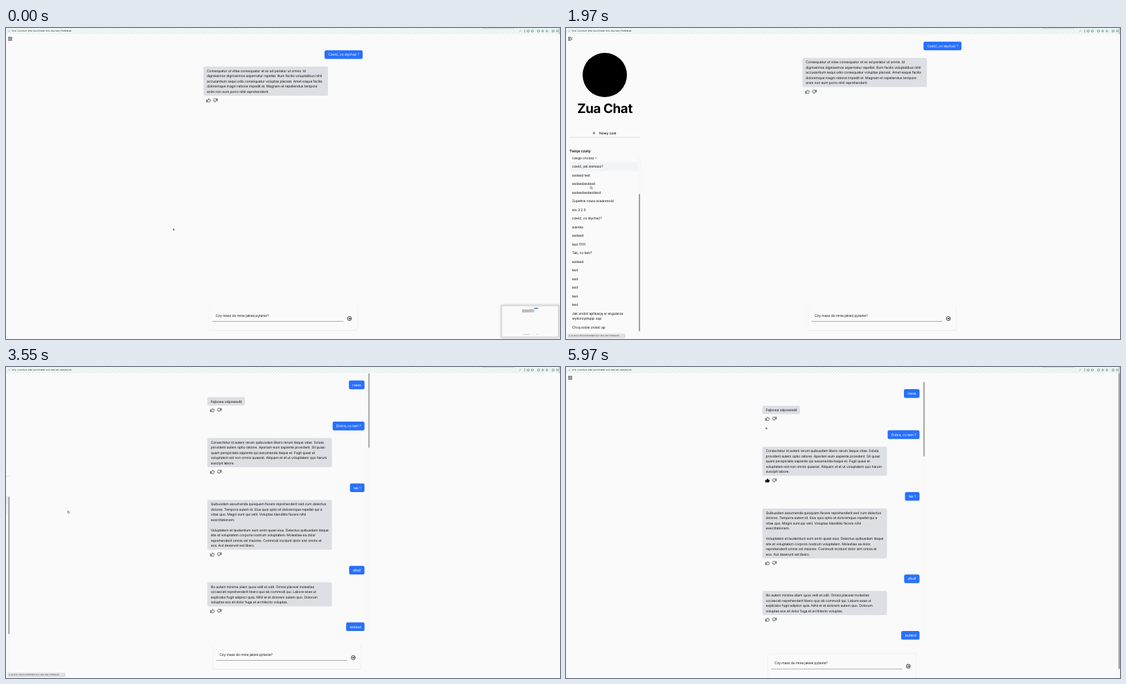
Write an HTML page that moves like this. It is 800 px wide and 450 px high and loops after 6000 ms.

```html
<!DOCTYPE html>
<html lang="pl">
<head>
<meta charset="utf-8">
<title>Chat</title>
<style>
html, body { margin: 0; width: 100%; height: 100%; overflow: hidden; background: #fafafa; }
svg { display: block; width: 100vw; height: 100vh; }
text {
  font: 5px Inter, "Open Sans", sans-serif; letter-spacing: -.02em; fill: #141414;
  text-rendering: geometricPrecision; white-space: pre;
}
.white { fill: #fff; }
.title { font-size: 18.75px; font-weight: 700; fill: #000; }
.head { font-size: 5.5px; font-weight: 600; }
.bold { font-weight: 500; }
.url { font: 700 2.28px "DejaVu Sans Mono", monospace; letter-spacing: 0; fill: #333; }
.link { font-size: 2.4px; letter-spacing: 0; fill: #333; }
.icon { fill: none; stroke: #222; stroke-width: 1.9; stroke-linejoin: round; }
.line { fill: none; stroke: #222; stroke-width: .9; }

/* One loop is 6 s, so 1 % is 60 ms. */
.slide { animation: 6s linear infinite; }
.step { animation: 6s step-end infinite; }
#chatA { animation-name: chatA; }
#msgA { animation-name: msgA; }
#chatB { animation-name: chatB; }
#pageB { animation-name: pageB; }
#side { animation-name: side; }
#list { animation-name: list; }
#thumb { animation-name: thumb; }
#hover { animation-name: hover; }
#status { animation-name: status; }
#preview { animation-name: preview; }
#pointer { animation-name: pointer; }
.first { animation-name: first; }
.second { animation-name: second; }
.burger { animation-name: burger; }
.late { animation-name: late; }
.arrow { animation-name: arrow; }
.hand { animation-name: hand; }
.beam { animation-name: beam; }
.liked { animation-name: liked; }

@keyframes first { 0% { visibility: visible } 56.3% { visibility: hidden } }
@keyframes second { 0% { visibility: hidden } 56.3% { visibility: visible } }
@keyframes burger { 0% { visibility: visible } 13.5% { visibility: hidden } 63% { visibility: visible } }
@keyframes late { 0% { visibility: hidden } 63% { visibility: visible } }
@keyframes liked { 0% { fill: none; stroke: #222 } 83.8% { fill: #000; stroke: #000 } }
@keyframes msgA { 0% { transform: translateY(12.5px) } 13.5% { transform: none } }
@keyframes chatA {
  0%, 13.83% { transform: translateX(0); animation-timing-function: cubic-bezier(.25,.8,.25,1) }
  20.5%, 100% { transform: translateX(56.2px) }
}
@keyframes chatB {
  0%, 56.3% { transform: translateX(56.2px); animation-timing-function: cubic-bezier(.25,.8,.25,1) }
  63%, 100% { transform: translateX(0) }
}
@keyframes pageB { 0% { transform: translate(1.6px,-12.5px) } 63% { transform: none } }
@keyframes side {
  0%, 13.83% { transform: translateX(-113px); animation-timing-function: cubic-bezier(.25,.8,.25,1) }
  20.5%, 56.3% { transform: translateX(0); animation-timing-function: cubic-bezier(.25,.8,.25,1) }
  63%, 100% { transform: translateX(-113px) }
}
@keyframes list {
  0%, 28.5% { transform: translateY(0); animation-timing-function: ease-in-out }
  34%, 40% { transform: translateY(-74.5px) }
  41.5% { transform: translateY(-62.7px); animation-timing-function: ease-out }
  47.5%, 100% { transform: translateY(0) }
}
@keyframes thumb {
  0%, 28.5% { transform: translateY(0); animation-timing-function: ease-in-out }
  34%, 40% { transform: translateY(57.7px) }
  41.5% { transform: translateY(48.5px); animation-timing-function: ease-out }
  47.5%, 100% { transform: translateY(0) }
}
@keyframes hover {
  0% { visibility: hidden }
  24% { visibility: visible; transform: translateY(12.5px) }
  25% { visibility: visible; transform: translateY(25px) }
  28% { visibility: visible; transform: translateY(37.5px) }
  31% { visibility: visible; transform: translateY(75px) }
  33% { visibility: visible; transform: translateY(112.5px) }
  43% { visibility: visible; transform: translateY(75px) }
  47% { visibility: visible; transform: translateY(37.5px) }
  50% { visibility: visible; transform: translateY(25px) }
  52.5% { visibility: visible; transform: translateY(12.5px) }
}
@keyframes status { 0%, 31% { opacity: 0 } 32%, 65.3% { opacity: 1 } 67.2%, 100% { opacity: 0 } }
@keyframes preview {
  0%, 18.5% { transform: none; animation-timing-function: ease-in }
  23%, 100% { transform: translateX(92px) }
}
@keyframes pointer {
  0%, .4% { transform: translate(241.3px,289.8px) }
  1% { transform: translate(95px,120px) }
  1.5%, 17% { transform: translate(4.8px,16.3px); animation-timing-function: ease-in-out }
  24%, 26% { transform: translate(36.3px,216px) }
  28.5%, 42% { transform: translate(35.5px,229px); animation-timing-function: ease-in-out }
  53%, 56.5% { transform: translate(21.5px,207px); animation-timing-function: ease-in-out }
  65%, 67.5% { transform: translate(346.8px,211px); animation-timing-function: ease-in-out }
  75% { transform: translate(298px,163px) }
  81.3%, 85% { transform: translate(291px,163.5px); animation-timing-function: ease-in-out }
  93%, 94.5% { transform: translate(290.5px,127.5px); animation-timing-function: ease-in-out }
  99.2%, 100% { transform: translate(288.4px,87px) }
}
@keyframes arrow {
  0% { visibility: visible } 23.5% { visibility: hidden } 60% { visibility: visible }
  65% { visibility: hidden } 70% { visibility: visible } 75% { visibility: hidden }
  86% { visibility: visible } 88% { visibility: hidden } 95.5% { visibility: visible }
}
@keyframes hand {
  0% { visibility: hidden } 23.5% { visibility: visible } 60% { visibility: hidden }
  75% { visibility: visible } 86% { visibility: hidden }
}
@keyframes beam {
  0% { visibility: hidden } 65% { visibility: visible } 70% { visibility: hidden }
  88% { visibility: visible } 95.5% { visibility: hidden }
}
</style>
</head>
<body>
<svg viewBox="0 0 800 450" preserveAspectRatio="none">
  <defs>
    <pattern id="stripes" width="3.2" height="3.2" patternUnits="userSpaceOnUse" patternTransform="rotate(45)">
      <rect width="3.2" height="3.2" fill="#f6faf9"/><rect width="1.5" height="3.2" fill="#e2efed"/>
    </pattern>
    <clipPath id="listBox"><rect x="0" y="187" width="112" height="258.5"/></clipPath>
    <filter id="soft" x="-20%" y="-20%" width="140%" height="140%"><feGaussianBlur stdDeviation="1.3"/></filter>
    <filter id="faint" x="-5%" y="-20%" width="110%" height="140%"><feGaussianBlur stdDeviation=".6"/></filter>
    <path id="like" d="M7.5 9.5 13.7 2.5 15 4 13.8 9H22v3l-3.3 8.2H7.5zM2 9.5h2.8v10.7H2z"/>
  </defs>
  <rect width="800" height="450" fill="#fafafa"/>

  <g id="chatA" class="slide"><g class="step first">
    <g id="msgA" class="step"></g>
    <g id="inputA"></g>
  </g></g>

  <g id="chatB" class="slide"><g class="step second"><g id="pageB" class="step">
    <path d="M515.6 22V397M518.4 22V397" stroke="#f0f0f0" stroke-width=".5"/>
    <rect x="516" y="21.5" width="2" height="108" rx="1" fill="#a9a9a9"/>
    <g id="msgB"></g>
    <g id="inputB" transform="translate(-1.7 12.5)"></g>
  </g></g></g>

  <g class="step late">
    <path d="M797.6 9V450" stroke="#eee" stroke-width=".5"/>
    <rect x="798" y="9" width="1.6" height="428" rx=".8" fill="#8c8c8c"/>
  </g>
  <path class="line step burger" d="M3 13.5H9M3 15.5H9M3 17.5H9"/>

  <g id="side" class="slide">
    <rect y="9" width="112" height="441" fill="#fafafa"/>
    <path class="line" d="M3 13.5H7M3 15.5H6.2M3 17.5H7M9 13.7 7.2 15.5 9 17.3"/>
    <circle cx="56" cy="68" r="32" fill="#000"/>
    <text class="title" x="56" y="122.6" text-anchor="middle">Zua Chat</text>
    <rect x="5" y="147" width="103" height="11.6" rx="1.5" fill="#d4d4d4" filter="url(#faint)"/>
    <rect x="4.6" y="145.5" width="103.6" height="12.3" rx="1.5" fill="#fbfbfb"/>
    <path d="M38.5 152H42.3M40.4 150.1V153.9" stroke="#222" stroke-width=".65"/>
    <text class="bold" x="48" y="153.8">Nowy czat</text>
    <text class="head" x="5" y="179.7">Twoje czaty</text>
    <g clip-path="url(#listBox)">
      <g id="list" class="slide">
        <rect x="5" y="187" width="100" height="12.5" rx="1" fill="#e9eaee"/>
        <rect id="hover" class="step" x="5" y="187" width="100" height="12.5" rx="1" fill="#f3f4f6"/>
      </g>
    </g>
    <path d="M104.9 187V445.5M107.1 187V445.5" stroke="#efefef" stroke-width=".4"/>
    <rect id="thumb" class="slide" x="105.2" y="187.5" width="1.7" height="199" rx=".8" fill="#929292"/>
  </g>

  <g id="preview" class="slide">
    <rect x="714" y="400" width="86" height="49" rx="2" fill="#d6d6d6" filter="url(#soft)"/>
    <rect x="716.5" y="402.5" width="80.5" height="44" rx="1" fill="#fafafa"/>
    <rect x="717" y="402.6" width="79" height=".6" fill="#e8efed"/>
    <rect x="762.5" y="404.8" width="6" height="1.4" fill="#4c6ea5"/>
    <rect x="745" y="407" width="18" height="4.6" fill="#c9cbd0"/>
    <path d="M746 408.2H761M746 409.6H762M746 410.8H755" stroke="#999" stroke-width=".4"/>
    <path d="M746.5 443.3H756M766 443.3H768" stroke="#aaa" stroke-width=".6"/>
  </g>

  <g id="status" class="slide">
    <rect x="2.5" y="442.6" width="83" height="5.8" rx="1.4" fill="#cfd1d4" filter="url(#faint)"/>
    <rect x="3" y="443" width="81.5" height="4.8" rx="1" fill="#dfe1e4"/>
    <circle cx="5" cy="445.4" r=".7" fill="#555"/>
    <text class="link" x="7.2" y="446.3">localhost:4200/chat/67678ddf-ace7-4da4-a9dc-002b1da740</text>
  </g>

  <rect width="800" height="8.8" fill="url(#stripes)"/>
  <rect x="688" width="46" height=".9" fill="#d2d6d6"/>
  <path d="M5.2 3.3 4.1 4.4 5.2 5.5" fill="none" stroke="#444" stroke-width=".5"/>
  <text class="url step first" x="8.6" y="5.1">http://localhost:4200/chat/67678ddf-6f2a-7ba4-9ab0-7f1948b8849b</text>
  <text class="url step second" x="8.6" y="5.1">http://localhost:4200/chat/67678ddf-ace7-4da4-a9dc-002b1daca740</text>
  <g id="tools" fill="none" stroke="#4c8580" stroke-width=".7"></g>
  <path d="M798.7 0V9" stroke="#667" stroke-width=".5"/>

  <g id="pointer" class="slide">
    <path class="step arrow" d="M0 0V3.1L.8 2.5 1.3 3.6 1.9 3.3 1.4 2.3H2.4Z" fill="#000" stroke="#fff" stroke-width=".25"/>
    <path class="step hand" d="M.2 .3Q.6-.2.9.4V1.5L2.5 1.9Q2.8 2.1 2.6 3L2.2 3.8H.7L-.5 2.3Q-.5 1.8.2 2.1Z" fill="#fff" stroke="#111" stroke-width=".45"/>
    <path class="step beam" d="M-.7-2.2Q0-2.2 0-1.7 0-2.2.7-2.2M0-1.7V1.7M-.7 2.2Q0 2.2 0 1.7 0 2.2.7 2.2" fill="none" stroke="#333" stroke-width=".4"/>
  </g>
</svg>
<script>
const add = (id, html) => document.getElementById(id).insertAdjacentHTML('beforeend', html);
const label = (x, y, s, cls = '') => `<text class="${cls}" x="${x}" y="${y + 1.8}">${s}</text>`;

const ask = (right, y, w, s) =>
  `<rect x="${right - w}" y="${y}" width="${w}" height="12.6" rx="2.2" fill="#2970fb"/>` +
  label(right - w + 5.2, y + 6.4, s, 'white');

const thumbs = (x, y, cls = '') =>
  `<use href="#like" class="icon ${cls}" transform="translate(${x - 3.5} ${y - 3.4}) scale(.29)"/>
   <use href="#like" class="icon" transform="translate(${x + 13.5} ${y + 3.4}) scale(-.29)"/>`;

const reply = (x, y, w, lines, cls) => {
  const h = lines.length * 7.5 + 4.8;
  return `<rect x="${x}" y="${y}" width="${w}" height="${h}" rx="2.2" fill="#dedfe4"/>` +
    lines.map((s, i) => label(x + 5, y + 6.2 + i * 7.5, s)).join('') +
    thumbs(x + 7.4, y + h + 6.6, cls);
};

const input = `
  <rect x="292.8" y="402" width="214.5" height="36" rx="1.5" fill="#e2e2e2" filter="url(#faint)"/>
  <rect x="293" y="402" width="214" height="35.4" rx="1.5" fill="#fafafa"/>
  ${label(302.8, 416, 'Czy masz do mnie jakieś pytanie?')}
  <path d="M298 424.5H487.3" stroke="#777" stroke-width=".6"/>
  <circle cx="496" cy="420.5" r="2.9" fill="none" stroke="#111" stroke-width=".8"/>
  <path d="M494.4 420.5H497.5M496.2 419.1 497.6 420.5 496.2 421.9" fill="none" stroke="#111" stroke-width=".8"/>`;

add('inputA', input);
add('inputB', input);

add('msgA', ask(515, 19.7, 55, 'Cześć, co słychać ?') + reply(285, 43.3, 180, [
  'Consequatur ut vitae consequatur et ex ad pariatur ut omnis. Id',
  'dignissimos dignissimos aspernatur repellat. Illum facilis voluptatibus nihil',
  'accusantium sequi odio consequatur voluptas placeat. Amet eaque facilis',
  'doloremque magni ratione impedit et. Magnam et repellendus tempore',
  'enim non eum porro nihil reprehenderit.'
]));

add('msgB',
  ask(510.5, 32.1, 22.5, 'rsesa') +
  reply(283.5, 56, 54.3, ['Fejkowa odpowiedź']) +
  ask(510.5, 91.6, 46, 'Dobra, co tam ?') +
  reply(283.5, 115.3, 180, [
    'Consectetur id autem rerum quibusdam libero rerum itaque vitae. Soluta',
    'provident autem optio ratione. Aperiam eum sapiente provident. Sit quasi',
    'quam perspiciatis sapiente qui assumenda itaque et. Fugit quasi et',
    'voluptatem est non omnis quaerat. Aliquam et et ut voluptatem quo harum',
    'suscipit labore.'
  ], 'step liked') +
  ask(510.5, 180.9, 21, 'tak ?') +
  reply(283.5, 204.8, 180, [
    'Quibusdam assumenda quisquam facere reprehenderit sed cum delectus',
    'dolores. Tempora autem id. Eius quis optio et doloremque repellat qui a',
    'vitae quo. Magni sunt qui velit. Voluptas blanditiis facere nihil',
    'exercitationem.',
    '',
    'Voluptatem et laudantium eum enim quasi eius. Delectus quibusdam itaque',
    'iste et voluptatem corporis nostrum voluptatem. Molestiae ea dolor',
    'reprehenderit omnis vel maiores. Commodi incidunt dolor sint omnis et',
    'eos. Aut deserunt est libero.'
  ]) +
  ask(510.5, 300.2, 22.2, 'dfsdf') +
  reply(283.5, 324.1, 180, [
    'Illo autem minima ullam quos velit et odit. Omnis placeat molestias',
    'occaecati reprehenderit libero quo ab commodi qui. Labore esse ut',
    'explicabo fugit adipisci quia. Nihil et et dolorem autem quo. Dolorum',
    'voluptas eos sit dolor fuga et architecto voluptas.'
  ]) +
  ask(510.5, 382, 26.5, 'asdasd'));

const chats = ['Cześć, co słychać ?', 'rsesa', 'asd', 'asdasd', 'test', 'czego chcesz ?',
  'cześć, jak siemasz?', 'asdasd test', 'asdasdasdasd', 'asdasdasdasdasd',
  'Zupełnie nowa wiadomość', 'elo 3 2 0', 'cześć, co słychać?', 'siamka', 'asdasd',
  'test 11111', 'Tak, co tam?', 'asdasd', 'test', 'asd', 'asd', 'test', 'test'];
add('list', chats.map((s, i) => label(8.8, 193.2 + i * 12.5, s)).join('') +
  label(8.8, 480.7, 'Jak zrobić aplikację w angularze') +
  label(8.8, 488.2, 'wykorzystując sup') +
  label(8.8, 500.7, 'Chcę sobie zrobić ap'));

add('tools',
  '<path d="M741.3 5.3 743.7 3M749 2V6.5"/>' +
  [754, 760, 769, 790].map(x => `<rect x="${x - 1.4}" y="3" width="2.8" height="2.6" rx=".5"/>`).join('') +
  [775, 781, 796].map(x => `<circle cx="${x}" cy="4.3" r="1.3"/>`).join(''));
</script>
</body>
</html>
```
